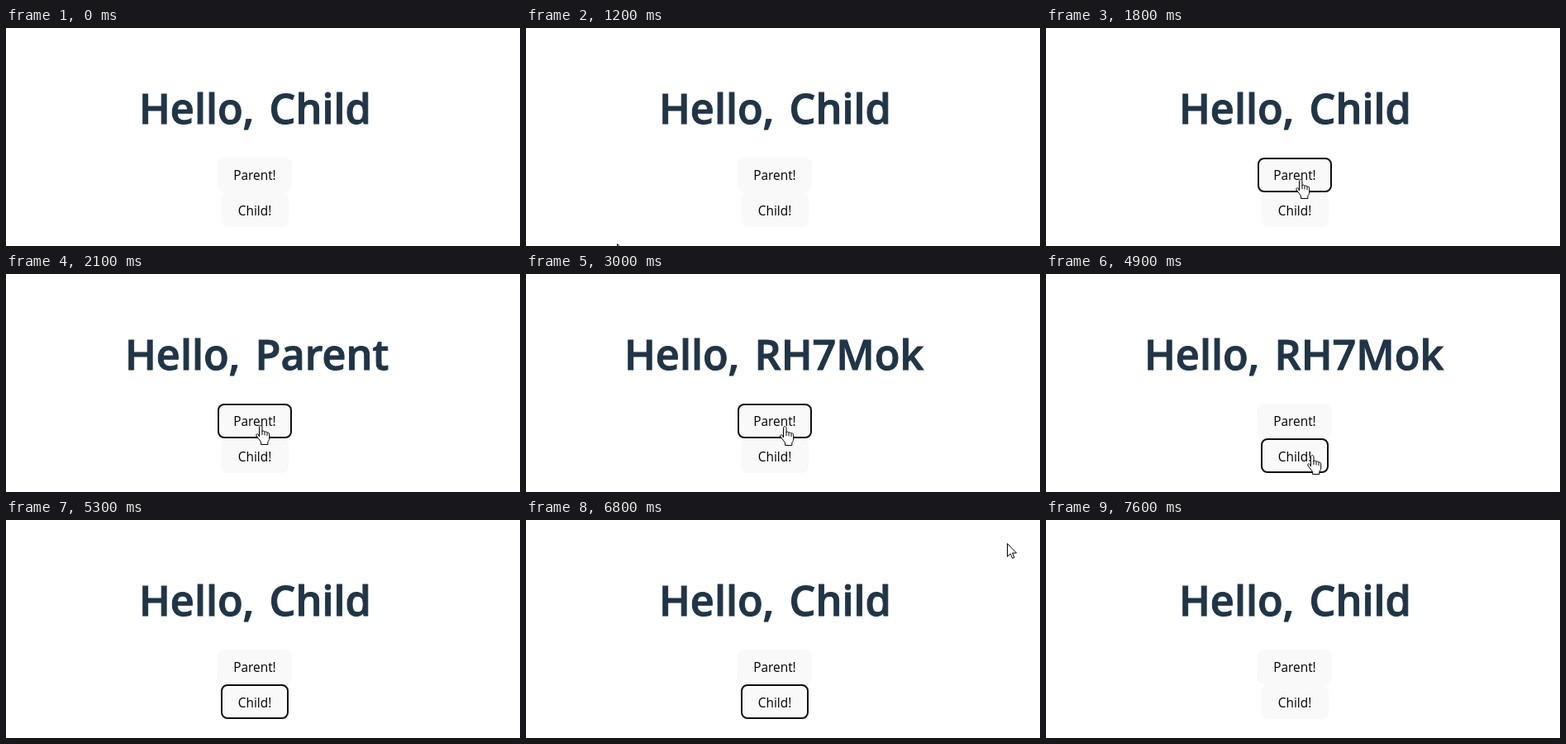
Animation, 622 px wide and 264 px high, one loop 7.7 s. Source, as an HTML page with a canvas:

```html
<!DOCTYPE html>
<html lang="en">
<head>
<meta charset="utf-8">
<title>Hello buttons</title>
<style>
  html, body { margin: 0; width: 100%; height: 100%; overflow: hidden; background: #fff; }
  canvas { display: block; width: 622px; height: 264px; }
</style>
</head>
<body>
<canvas id="stage"></canvas>
<script>
const W = 622, H = 264, LOOP = 7700, STEP = 100;
const canvas = document.getElementById('stage');
const ctx = canvas.getContext('2d');
const dpr = window.devicePixelRatio || 1;
canvas.width = W * dpr;
canvas.height = H * dpr;

const SANS = '"Open Sans", "Noto Sans", sans-serif';
const NAME_GAP = 157.5;

// Each state holds from its start time until the next entry.
const titles = [
  { t: 0, name: 'Child', x: 161 },
  { t: 1900, name: 'Parent', x: 144 },
  { t: 2900, name: 'RH7Mok', x: 119 },
  { t: 5000, name: 'Child', x: 161 }
];
const focus = [
  { t: 0, label: '' },
  { t: 1800, label: 'Parent!' },
  { t: 4800, label: 'Child!' },
  { t: 7600, label: '' }
];
const buttons = [
  { label: 'Parent!', x: 256, y: 157, w: 90, h: 42, base: 184 },
  { label: 'Child!', x: 260, y: 199, w: 82, h: 42, base: 227 }
];

// Pointer visits: time, x, y of the hot spot.
const trips = [
  { end: 5200, path: [
    [1200, 110, 261], [1800, 309, 183], [2900, 309, 183],
    [3600, 406, 204], [3800, 435, 224], [4000, 442, 234],
    [4300, 442, 234], [4600, 395, 243], [4800, 323, 219],
    [4900, 323, 219], [5100, 326, 230]
  ] },
  { end: 6900, path: [[6800, 582, 28]] }
];

const arrow = new Path2D('M.5 .5V16.4L4.2 12.9L6.7 18.4L9 17.4L6.6 12H11.5Z');
const hand = new Path2D(
  'M4.5 14V2.4C4.5 0 8 0 8 2.4V8C8.4 6.6 11 6.8 11 8.6' +
  'C11.4 7.4 14 7.8 14 9.4C14.6 8.6 16.7 9 16.7 10.8V16' +
  'C16.7 18.4 15 19.2 14.8 20.8V23.5H6.6V21' +
  'C5.8 18.6 2.8 15.8 1 13C0 11 2.2 10 3.4 11.4Z');
const fingers = new Path2D('M8 7.5V12M11 8.6V12.4M14 9.4V13');

const current = (list, t) => list.filter(s => s.t <= t).pop();
const smooth = p => p * p * (3 - 2 * p);

function pointerAt(t) {
  const trip = trips.find(s => t >= s.path[0][0] && t < s.end);
  if (!trip) return null;
  const i = trip.path.findIndex(k => k[0] > t);
  if (i < 0) return trip.path[trip.path.length - 1].slice(1);
  const [t0, x0, y0] = trip.path[i - 1];
  const [t1, x1, y1] = trip.path[i];
  const p = smooth((t - t0) / (t1 - t0));
  return [x0 + (x1 - x0) * p, y0 + (y1 - y0) * p];
}

// A thin stroke gives a weight between semibold and bold.
function heavyText(text, x, y) {
  ctx.fillText(text, x, y);
  ctx.strokeText(text, x, y);
}

function drawTitle({ name, x }) {
  ctx.font = `600 50.4px ${SANS}`;
  ctx.textAlign = 'left';
  ctx.fillStyle = ctx.strokeStyle = '#213547';
  ctx.lineWidth = 1;
  ctx.lineJoin = 'miter';
  heavyText('Hello,', x, 116);
  heavyText(name, x + NAME_GAP, 116);
}

function drawButton({ label, x, y, w, h, base }, focused) {
  ctx.fillStyle = '#f9f9f9';
  ctx.beginPath();
  ctx.roundRect(x, y, w, h, 8);
  ctx.fill();
  if (focused) {
    ctx.strokeStyle = '#101010';
    ctx.lineWidth = 2;
    ctx.beginPath();
    ctx.roundRect(x + 1, y + 1, w - 2, h - 2, 7);
    ctx.stroke();
  }
  ctx.font = `400 15.4px ${SANS}`;
  ctx.textAlign = 'center';
  ctx.fillStyle = '#000';
  ctx.fillText(label, x + w / 2, base);
}

function drawPointer([px, py]) {
  const x = Math.round(px), y = Math.round(py);
  const over = buttons.some(b => x >= b.x && x < b.x + b.w && y >= b.y && y < b.y + b.h);
  const shape = over ? hand : arrow;
  ctx.save();
  ctx.translate(over ? x - 7 : x, y);
  ctx.lineWidth = 1;
  ctx.lineJoin = 'round';
  ctx.fillStyle = '#fff';
  ctx.strokeStyle = '#000';
  ctx.fill(shape);
  ctx.stroke(shape);
  if (over) ctx.stroke(fingers);
  ctx.restore();
}

function draw(t) {
  ctx.setTransform(dpr, 0, 0, dpr, 0, 0);
  ctx.fillStyle = '#fff';
  ctx.fillRect(0, 0, W, H);
  drawTitle(current(titles, t));
  const { label } = current(focus, t);
  buttons.forEach(b => drawButton(b, b.label === label));
  const pointer = pointerAt(t);
  if (pointer) drawPointer(pointer);
}

const start = performance.now();
function tick() {
  const t = (performance.now() - start) % LOOP;
  draw(Math.floor(t / STEP) * STEP);
  requestAnimationFrame(tick);
}
tick();
</script>
</body>
</html>
```
